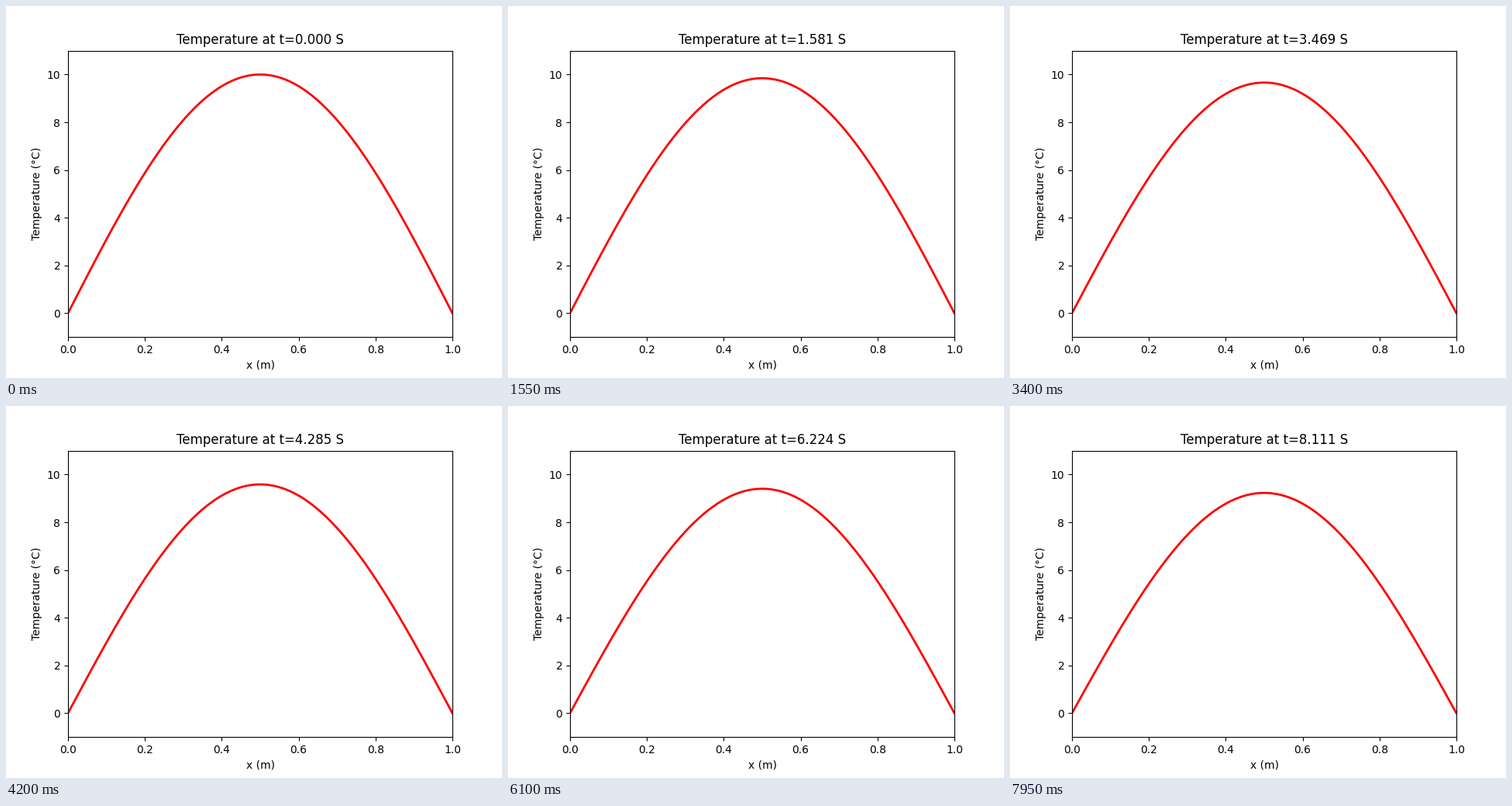
Recreate the animation shown at these times as a matplotlib script. Size 640 by 480 pixels, loop 8000 ms.

```python
import numpy as np
import matplotlib.pyplot as plt
from matplotlib.animation import FuncAnimation

NODES = 100
FRAMES = 160
ALPHA = 1e-3                      # diffusivity, m^2/s
DX = 1 / (NODES - 1)
DT = 0.5 * DX ** 2 / ALPHA        # stability limit of the explicit scheme

x = np.linspace(0, 1, NODES)
start = 10 * np.sin(np.pi * x)
decay = np.cos(np.pi * DX)        # each step averages the two neighbours

fig, ax = plt.subplots(figsize=(6.4, 4.8), dpi=100)
line, = ax.plot(x, start, color="red", lw=2)
ax.set_xlim(0, 1)
ax.set_ylim(-1, 11)
ax.set_xlabel("x (m)")
ax.set_ylabel("Temperature (°C)")
title = ax.set_title("Temperature at t=0.000 S")


def update(step):
    line.set_ydata(start * decay ** step)
    title.set_text(f"Temperature at t={step * DT:.3f} S")
    return line, title


anim = FuncAnimation(fig, update, frames=FRAMES, interval=50,
                     repeat=True, repeat_delay=0, blit=False)
plt.show()
```
